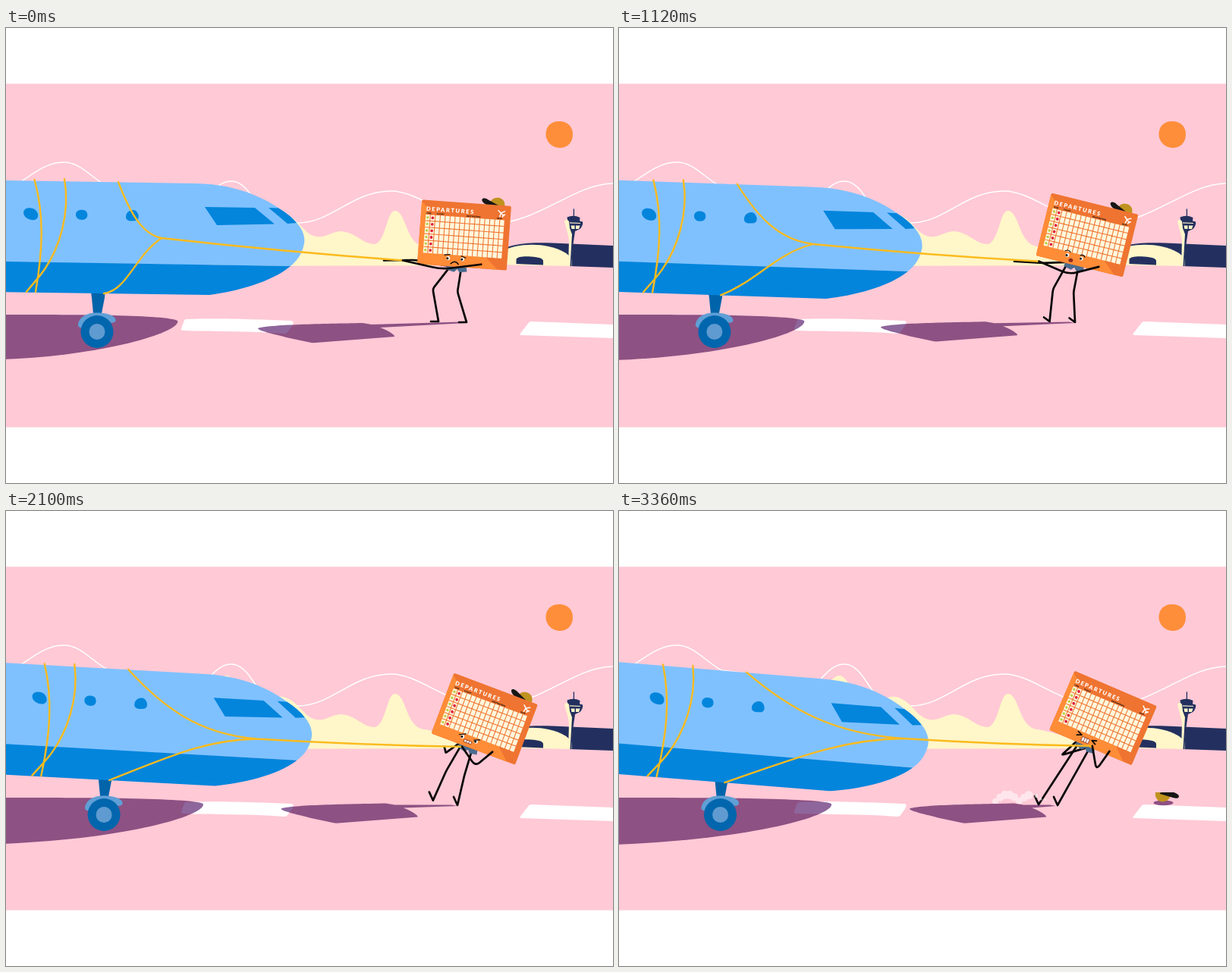
Recreate the animation shown at these times as an HTML page with a canvas. Size 800 by 600 pixels, loop 3.43 s.

```html
<!DOCTYPE html>
<html lang="en">
<head>
<meta charset="utf-8">
<title>Pulling a plane</title>
<style>
  html, body { margin: 0; width: 100%; height: 100%; overflow: hidden; background: #fff; }
  canvas { display: block; }
</style>
</head>
<body>
<canvas id="stage" width="800" height="600"></canvas>
<script>
const ctx = document.getElementById('stage').getContext('2d');
const LOOP = 3430, STEP = 70;
const BLUE = '#0385dc', LIGHT = '#7fc1ff', NAVY = '#23305f', CREAM = '#fff6c9';
const ROPE = '#fbbb1e', INK = '#060606', SHADE = '#8e669c', RUST = '#ef7431';

const clamp = k => Math.max(0, Math.min(1, k));
const lerp = (a, b, k) => a + (b - a) * k;
const mix = (p, q, kx, ky = kx) => [lerp(p[0], q[0], kx), lerp(p[1], q[1], ky)];
const add = (p, x, y) => [p[0] + x, p[1] + y];
const ramp = (t, from, to) => clamp((t - from) / (to - from));
const ease = (t, from, to) => { const u = ramp(t, from, to); return u * u * (3 - 2 * u); };

function turn(x, y, angle, cx, cy) {
  const c = Math.cos(angle), s = Math.sin(angle);
  return [cx + x * c - y * s, cy + x * s + y * c];
}

// Everything follows from a few phases: brace, lean back, slack in the rope, heave, drag.
function poseAt(t) {
  const brace = ease(t, 0, 840), lean = ease(t, 840, 1400), heave = ease(t, 1820, 2450);
  const slack = ease(t, 1400, 1820) - heave;
  const drag = ramp(t, 2450, 3360), walk = ramp(t, 1820, 3360);
  const slip = heave - ease(t, 2450, 3010);

  const planeX = 2.5 * brace + 9 * lean + 6 * drag;
  const planeTilt = .044 * ramp(t, 0, 1820) ** 1.75 - .0095 * heave + .032 * drag;
  const boardX = 604 + 26 * lean - 2 * slack + 8 * ramp(t, 1820, 3010);
  const boardY = 273 + 2 * slack;
  const boardTilt = (4.2 + 2.6 * brace + 14.2 * lean + 2.2 * walk - 2 * slip) * Math.PI / 180;
  const onPlane = (x, y) => turn(x - 3, y - 245, planeTilt, 3 + planeX, 245);
  const onBoard = (x, y) => turn(x, y, boardTilt, boardX, boardY);

  const reach = mix([523, 306.5], [584 + 8 * slack, 309 + 2 * slack], lean);
  const grip = mix(reach, onBoard(1.5, 39.5), heave);
  const backHand = add(grip, -(25 + 15 * lean) * (1 - heave), 0);
  const backShoulder = onBoard(-20, 42), shoulder = onBoard(25, 37);

  const leg = (hip, foot, bend) => ({
    hip, foot,
    knee: add(mix(hip, foot, .46), -bend, -bend / 3),
    toe: add(foot, -10 + 5 * lean, -11 * lean)
  });
  const bent = 1 - lean + .25 * Math.sin(Math.PI * walk);
  return {
    planeX, planeTilt, boardX, boardY, boardTilt, onPlane, grip, backHand, backShoulder, shoulder, lean, walk,
    wheelX: 120 + planeX - 60 * planeTilt,
    shadowTip: 226 + t * .016,
    floorFoot: 607 - 12 * lean - 19 * drag * drag,
    knot: [205 + 10 * brace + 82 * lean + 11 * slack + 65 * heave + 13 * drag,
      277 + 6 * brace + 4 * lean + 16 * slack + 10 * heave + 3 * drag],
    backElbow: add(mix(backHand, backShoulder, .5), 8 * lean - 38 * heave, -4 + 11 * lean + 8 * heave),
    elbow: add(mix(grip, shoulder, .5), -6 * heave, 9 + 9 * lean + 10 * heave),
    legs: [
      leg(onBoard(-17, 45), [570 - 5 * lean - 12 * walk, 387 - 10 * Math.sin(Math.PI * walk)], 15 * bent),
      leg(onBoard(-1, 46), [607 - 12 * lean - 17 * ramp(t, 3010, 3360),
        388 - 6 * Math.sin(Math.PI * ramp(t, 2240, 3360))], 8 * bent)
    ]
  };
}

function fill(color, d) { ctx.fillStyle = color; ctx.fill(new Path2D(d)); }
function stroke(color, width, d) {
  ctx.strokeStyle = color;
  ctx.lineWidth = width;
  ctx.stroke(new Path2D(d));
}
function oval(color, x, y, rx, ry = rx, angle = 0) {
  ctx.fillStyle = color;
  ctx.beginPath();
  ctx.ellipse(x, y, rx, ry, angle, 0, 7);
  ctx.fill();
}
function within(x, y, angle, draw) {
  ctx.save();
  ctx.translate(x, y);
  ctx.rotate(angle);
  draw();
  ctx.restore();
}
// Limb with a joint; soft sets how much of each half is rounded off.
function limb(a, b, c, soft, end = c) {
  stroke(INK, 2.7, `M${a}L${mix(b, a, soft)}Q${b} ${mix(b, c, soft)}L${c}L${end}`);
}

function drawScene() {
  ctx.fillStyle = '#fff';
  ctx.fillRect(0, 0, 800, 600);
  ctx.fillStyle = '#ffc9d6';
  ctx.fillRect(0, 73.5, 800, 453);
  fill('#ff8e3a', 'M729 123C740 123 747 130 747 140C747 151 740 158 730 158C719 158 711 149 711.5 139C712 129 719 123 729 123Z');
  stroke('#fff', 1.5, 'M0 216C30 197 50 177 76 177C98 177 112 197 135 210L262 226C280 205 288 202 297 202' +
    'C315 202 325 225 335 238C350 252 365 257 384 257C430 257 455 215 508 215C545 215 585 258 640 258C700 258 750 205 800 205');
  fill(CREAM, 'M270 314V235C278 225 284 217 291 217C300 218 308 240 325 248C345 256 350 243 365 245' +
    'C385 250 390 268 405 274C420 279 428 268 442 268C462 270 470 285 486 285C500 283 502 242 512 241' +
    'C528 240 526 286 552 288C575 292 590 300 640 308V313Z');

  // Terminal and control tower
  fill(NAVY, 'M655 291C675 283 695 283 720 283.5L800 287V316L742 314V300Z');
  fill(CREAM, 'M650 296C670 285 695 284 715 288C732 292 742 298 743 303V314L650 312Z');
  fill(NAVY, 'M672.5 311V305C674 301 684 301 692 301.5C702 302 708 304 708 307V312.5Z');
  fill(CREAM, 'M736 254L746 251L747 270L745.5 314H741L742 280C741 270 737 262 736 254Z');
  fill(NAVY, 'M739.5 249.5Q748 246 756.5 250L756 254.5L760 255.5Q761 260 756.5 265L750 268L747.5 285L745 314H743.5L746 272L743 264L742 255L740 253Z');
  stroke(NAVY, 1.3, 'M748.4 239V250');
  fill(CREAM, 'M744.5 260.5H749.5V265H745.5ZM751 260.5H756.5L755 265H751ZM743 256.2L757 257V258L743 257.4Z');

  // Runway
  fill('#fff', 'M237 384C270 382 330 384 375 386C380 386 379 389 377 393L371 401Q370 403 366 403C320 399 280 401 234 399Q230 399 231 396L234 388Q235 384 237 384Z');
  fill('#fff', 'M692 387L800 391V409L679 405Q676.5 405 678 402.5L689 388.5Q690 387 692 387Z');
}

function drawShadows(p, fall) {
  const s = p.shadowTip, foot = p.floorFoot;
  const dx = 26 * p.lean + 25 * p.walk, dy = -3.5 * p.lean;
  const at = (x, y) => `${x + dx} ${y + dy} `;
  ctx.globalCompositeOperation = 'multiply';
  fill(SHADE, `M-5 378C90 378 ${s - 15} 378 ${s} 386C${s + 6} 400 ${s - 94} 432 -5 ${437 + (s - 226) / 18}Z`);
  fill(SHADE, `M${at(332, 396)}C${at(345, 391)}${at(420, 390)}${at(470, 389)}L${at(482, 391)}L${foot - 8} 387.5` +
    `L${foot} 389L${at(493, 395)}C${at(504, 399)}${at(513, 405)}${at(512, 407)}L${at(408, 415)}` +
    `Q${at(404, 415.5)}${at(400, 414.5)}L${at(374, 409)}C${at(350, 403)}${at(332, 399)}${at(332, 396)}Z`);
  if (fall > 0) {
    ctx.globalAlpha = lerp(.3, 1, fall);
    oval(SHADE, 717.5, 384.8, lerp(5, 13, fall), lerp(2.5, 3.4, fall));
    ctx.globalAlpha = 1;
  }
  ctx.globalCompositeOperation = 'source-over';
}

function drawPlane(p) {
  within(p.wheelX, 400.5, 0, () => {
    fill('#0064aa', 'M-9 -60L11 -60L10 -45L6 -24H-5L-7 -45Z');
    fill('#5f9fd6', 'M-25 -8C-25 -20 -12 -26 3 -25C17 -24 25 -20 24.5 -15Q24 -11 17 -12L-15 -6Q-24 -4 -25 -8Z');
    oval('#0166ad', 0, 0, 21.5);
    oval('#5f9bd0', 0, 0, 10.5);
  });
  within(3 + p.planeX, 245, p.planeTilt, () => {
    ctx.translate(-3, -245);
    fill(LIGHT, 'M-60 200L250 205C310 206 350 228 376 250C388 260 395 272 393 284C390 300 382 308 375 314L-60 308Z');
    fill(BLUE, 'M-60 307L375 314C350 335 305 347 268 352L-60 347.5Z');
    fill(BLUE, 'M262 236L328 237L354 258.5L278 260ZM346 237L359 237.5Q374 246 383 257L371 258Z');
    fill(BLUE, 'M23 243C24 236 34 236 39 240C43 244 44 251 38 253C31 254 23 250 23 243Z');
    fill(BLUE, 'M92 246C92 239 102 238 106 242C109 247 107 253 100 253C95 253 92 250 92 246Z');
    fill(BLUE, 'M158 249C158 242 166 238 171 241C176 245 176 253 171 254C165 255 158 255 158 249Z');
    stroke(ROPE, 2.4, 'M37.5 200C50 245 49 290 39 348M77 199C85 245 70 290 51 318C42 331 33 340 27 348');
  });
}

function drawRope(p) {
  const top = p.onPlane(148, 203), low = p.onPlane(129, 350), knot = p.knot;
  const taut = clamp((knot[0] - 210) / 100);
  const sag = add(mix(knot, p.grip, .5), 0, 3);
  stroke(ROPE, 2.3, `M${top}C${mix(top, knot, .27, .55)} ${mix(top, knot, .55, .93)} ${knot}Q${sag} ${p.grip}` +
    `M${low}C${mix(low, knot, .4, lerp(.05, .56, taut))} ${mix(low, knot, .54 + .11 * taut, lerp(.68, .98, taut))} ${knot}`);
}

function drawHat(p, fall) {
  const [x, y] = turn(40, -41, p.boardTilt, p.boardX, p.boardY);
  const angle = lerp(p.boardTilt + .14, Math.PI, fall);
  within(lerp(x, 717, clamp(fall * 2)), lerp(y, 372, fall), angle, () => {
    fill('#c0921e', 'M-10 1C-11 -7 -5 -11.5 1 -11.5C8 -11 11 -5 10 1Z');
    fill('#171715', 'M-21 -4C-21 -7 -17 -7.5 -13 -6L4 -1Q5 1 1 1H-14Q-20 -1 -21 -4Z');
  });
}

function drawFace(mood) {
  if (mood < 3) {
    for (const x of [-19, 0]) {
      oval('#fff', x, 32, 2.5);
      oval(INK, x - .8, 32.3, 1.5);
    }
    stroke(INK, 1.2, ['M-24 28L-17 27M-2 28L4 30', 'M-23 27Q-19 24 -16 27M-2 28Q2 26 4 29', 'M-24 31L-16 27M-3 31L4 28'][mood]);
  } else {
    stroke(INK, 1.7, 'M-23 29L-17 31.5L-23 34M4 31L-2 33L4 36');
  }
  if (mood < 1) stroke(INK, 1.5, 'M-15 39Q-10 33 -5 39');
  else if (mood < 2) oval('#8f2a22', -13, 37.5, 3, 2.5);
  else {
    const h = mood < 3 ? 3.5 : 6, y = 36 - h / 2;
    ctx.fillStyle = '#fff';
    ctx.fillRect(-15, y, 10, h);
    stroke('#8b3a20', .8, `M-15 ${y}h10v${h}h-10zm3.3 0v${h}m3.3 0v${-h}`);
  }
}

function label(text, x, y, size, color, gap) {
  ctx.font = `900 ${size}px Lato, "Open Sans", sans-serif`;
  ctx.letterSpacing = gap + 'px';
  ctx.fillStyle = color;
  ctx.fillText(text, x, y);
}

function drawBoard(mood) {
  fill(RUST, 'M-57 -42.5H57Q59 -42.5 59 -40.5V40.5Q59 42.5 57 42.5H-57Q-59 42.5 -59 40.5V-40.5Q-59 -42.5 -57 -42.5Z');
  fill('#ff8c37', 'M-59 -40L-51 -33V27H30L47 42.5H-57Q-59 42.5 -59 40Z');
  label('DEPARTURES', -52.5, -28.5, 7.5, '#fff', 1.6);
  label('TIME', -52, -24.4, 2.6, INK, .1);
  label('FLIGHT', -38, -24.4, 2.6, INK, .1);
  label('DESTINATION', 1, -24.4, 2.6, INK, .1);
  label('GATE', 41, -24.4, 2.6, INK, .1);
  stroke('#fff', 1.5, 'M42.5 -35.5L50 -29M46 -32.5L51 -35M46 -32.5L45 -27.5M49 -30L51.5 -30.5M49 -30L48.5 -27.5');
  for (let r = 0; r < 6; r++) {
    const y = -23.3 + r * 8.6;
    ctx.fillStyle = '#fff7dc';
    for (let c = 0; c < 16; c++) ctx.fillRect(-52.5 + c * 6.55, y, 5.5, 7.5);
    oval('#b9cf4a', -49.8, y + 3.7, 1.7);
    oval('#e01f3d', -43.2, y + 3.7, 1.9);
  }
  drawFace(mood);
}

function drawRunner(p, mood, fall) {
  const inBoard = draw => within(p.boardX, p.boardY, p.boardTilt, draw);
  for (const { hip, knee, foot, toe } of p.legs) limb(hip, knee, foot, .08, toe);
  limb(p.backHand, p.backElbow, p.backShoulder, .08);
  inBoard(() => fill('#4c6c8e', 'M-19 38H5L7 48L-3 49.5L-6 45.5L-10 49.5L-20 47Z'));
  drawHat(p, fall);
  inBoard(() => drawBoard(mood));
  drawRope(p);
  limb(p.grip, p.elbow, p.shoulder, .25);
}

function drawDrops(t) {
  const drop = (age, life, x, y, vx, vy) => {
    if (age < 0 || age > life) return;
    const r = lerp(4.8, 2, age / life);
    oval('#62b8f5', x + vx * age, y + vy * age, r, r * .55, Math.atan2(vy, vx) + .4);
  };
  for (let i = 0; i < 2; i++) {
    drop(t - 2338 - 420 * i, 300, 590, 238, -.25, -.008);
    drop(t - 2500 - 258 * i, 340, 700, 262, .155, .1);
  }
}

function drawDust(t) {
  const grow = ramp(t, 2730, 2940), fade = ramp(t, 3010, 3360);
  if (!grow) return;
  const puff = (x, y, r) => {
    const px = x - 15 * fade, py = lerp(386, lerp(y, 386, .4 * fade), grow);
    const size = r * grow * (1 - .4 * fade);
    ctx.moveTo(px + size, py);
    ctx.arc(px, py, size, 0, 7);
  };
  ctx.save();
  ctx.beginPath();
  ctx.rect(440, 300, 200, 86);
  ctx.clip();
  ctx.fillStyle = `rgba(255,255,255,${1 - .45 * fade})`;
  ctx.beginPath();
  for (let i = 0; i < 8; i++) {
    const rise = Math.abs(Math.sin(i * .62));
    puff(511 + 6.3 * i, 381 - 15 * rise, 7 + 2.5 * rise);
  }
  for (let i = 0; i < 3; i++) puff(565 + 6 * i, 374 - 5 * Math.cos(i * 2), 4 - i);
  ctx.fill();
  ctx.restore();
}

function frame() {
  const t = Math.floor(performance.now() % LOOP / STEP) * STEP;
  const p = poseAt(t);
  const fall = ramp(t, 2310, 2590);
  const mood = [560, 1190, 2240].filter(start => t >= start).length;
  ctx.lineCap = ctx.lineJoin = 'round';
  drawScene();
  drawShadows(p, fall);
  drawPlane(p);
  drawRunner(p, mood, fall);
  drawDust(t);
  drawDrops(t);
  requestAnimationFrame(frame);
}
frame();
</script>
</body>
</html>
```
